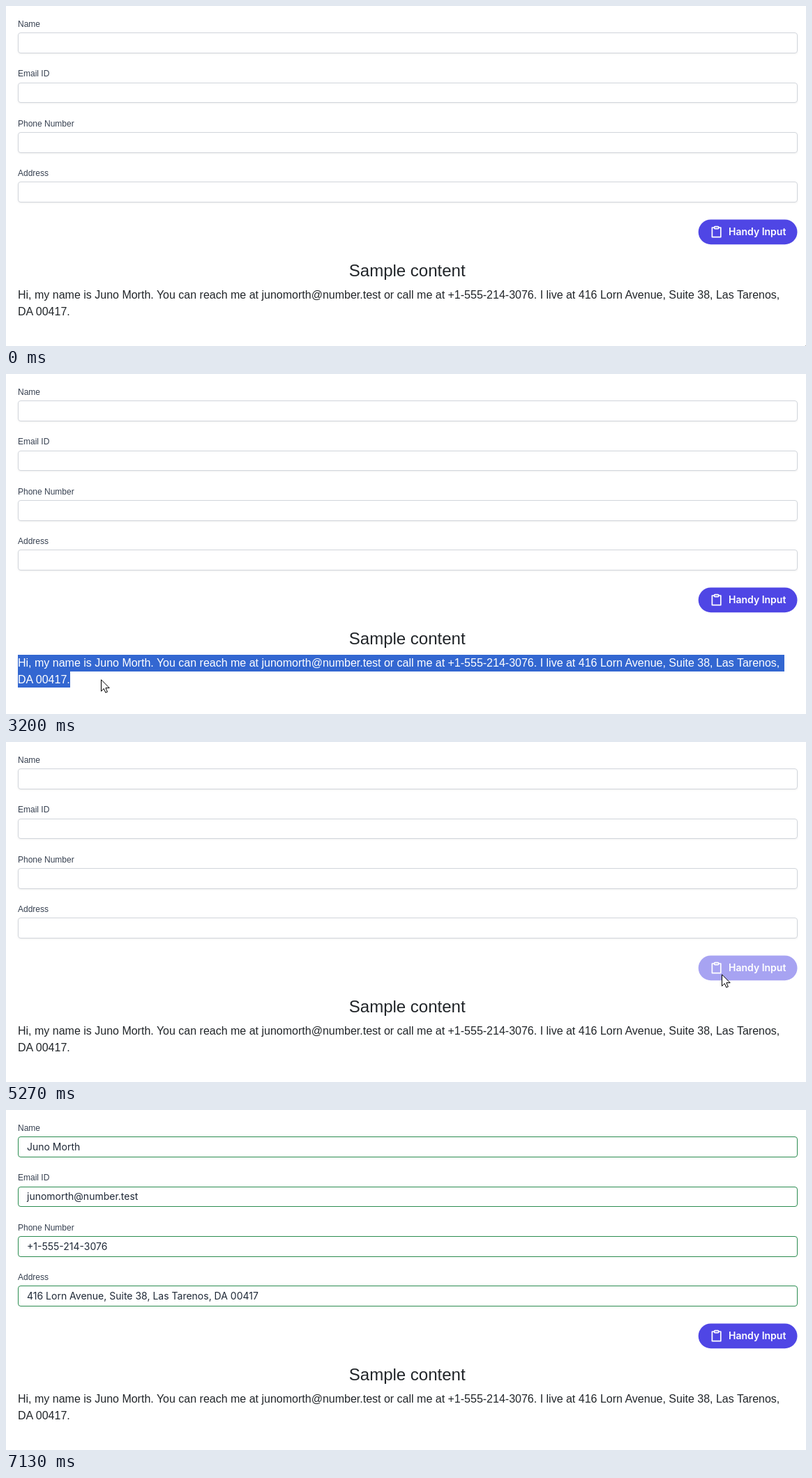
These frames come from a looping animation (1147 by 488 pixels, 7800 ms). An HTML page:

```html
<!DOCTYPE html>
<html lang="en">
<head>
<meta charset="utf-8">
<title>Form fill demo</title>
<style>
  html, body { margin: 0; width: 100%; height: 100%; overflow: hidden; background: #fff; }
  svg { display: block; }
  text { font: 16px "Liberation Sans", Arial, sans-serif; fill: #212529; white-space: pre; }
  .label { font-size: 12px; fill: #374151; }
  .value { font: 14px Inter, sans-serif; fill: #1f2937; }
  .heading { font-size: 24px; text-anchor: middle; }
  .caption { font: 600 14px Inter, sans-serif; fill: #fff; }
  .box { fill: #fff; stroke: #d1d5db; filter: drop-shadow(0 1px 1px rgba(0, 0, 0, .06)); }
  .valid .box { stroke: #2b8c50; filter: none; }
  .pointer { fill: #fff; stroke: #000; stroke-linejoin: round; }
  #beam { fill: #fff; mix-blend-mode: difference; }
  #marked text { fill: #fff; }
</style>
</head>
<body>
<svg width="1147" height="488" viewBox="0 0 1147 488">
  <defs>
    <clipPath id="range"><path id="rangePath"/></clipPath>
  </defs>
  <rect width="1147" height="488" fill="#fff"/>
  <g id="form"></g>
  <rect id="button" x="992.7" y="306.5" width="141.8" height="35.7" rx="17.8"/>
  <g fill="none" stroke="#fff" stroke-width="1.7" stroke-linejoin="round">
    <path d="M1015.5 318H1012.4V331.6H1024.8V318H1021.7"/>
    <rect x="1015.5" y="316.6" width="6.2" height="3" rx="1"/>
  </g>
  <text class="caption" x="1036" y="329">Handy Input</text>
  <text class="heading" x="575.2" y="388">Sample content</text>
  <g id="plain"></g>
  <g id="marked" clip-path="url(#range)">
    <rect x="17" y="403" width="1099" height="47" fill="#3367d1"/>
  </g>
  <path id="beam" d="M-4.5-9H-1L0-8.5 1-9H4.5V-8H1L.5-7.5V7.5L1 8H4.5V9H1L0 8.5-1 9H-4.5V8H-1L-.5 7.5V-7.5L-1-8H-4.5Z"/>
  <path id="arrow" class="pointer" d="M.5 .8V17.3L4.3 13.6 6.8 19.3 9.4 18.2 6.9 12.6H12.2Z"/>
  <path id="hand" class="pointer" d="M5.5 14V2.2a1.6 1.6 0 0 1 3.2 0V10 7.5a1.4 1.4 0 0 1 2.8 0V10.5 8.3a1.4 1.4 0 0 1 2.8 0V11 9.6a1.3 1.3 0 0 1 2.6 0V15.5Q16.9 21.8 11 21.8 7 21.8 5.2 18.8L1.2 13.4A1.5 1.5 0 0 1 3.4 11.4L5.5 13.5Z"/>
</svg>
<script>
const $ = id => document.getElementById(id);
const LOOP = 7800, RATE = 15, ROW = 71.33;

const person = {
  name: 'Juno Morth',
  mail: 'junomorth@number.test',
  phone: '+1-555-214-3076',
  street: '416 Lorn Avenue, Suite 38, Las Tarenos,',
  zip: 'DA 00417'
};
const lines = [
  `Hi, my name is ${person.name}. You can reach me at ${person.mail} or call me at ${person.phone}. I live at ${person.street}`,
  `${person.zip}.`
];
const fields = [
  ['Name', person.name],
  ['Email ID', person.mail],
  ['Phone Number', person.phone],
  ['Address', `${person.street} ${person.zip}`]
];

function add(parent, tag, attrs, text = '') {
  const el = document.createElementNS('http://www.w3.org/2000/svg', tag);
  for (const key in attrs) el.setAttribute(key, attrs[key]);
  el.textContent = text;
  $(parent).append(el);
  return el;
}

const values = fields.map(([label, value], i) => {
  const snap = y => Math.round(y + ROW * i);
  const top = snap(38.4), bottom = snap(67.9);
  add('form', 'text', { class: 'label', x: 17, y: snap(29.9) }, label);
  add('form', 'rect', { class: 'box', x: 17.5, y: top + .5, width: 1117, height: bottom - top - 1, rx: 3.5 });
  return add('form', 'text', { class: 'value', x: 30, y: snap(58) }, value);
});
for (const id of ['plain', 'marked'])
  lines.forEach((line, i) => add(id, 'text', { x: 17, y: 420 + 24 * i }, line));

// Each move eases the pointer to a new place: from tick, to tick, x, y
const home = [1146, 487];
const moves = [
  [2, 5, 369, 349], [7, 16, 101, 441], [23, 27, 19, 424], [27, 31, 17, 429],
  [36, 37, 12, 419], [43, 48, 136, 438], [55, 60, 699, 440], [62, 71, 1026, 333],
  [99, 107, 60, 495]
];

const within = (tick, from, to) => tick >= from && tick < to;

function ease(k) {
  k = Math.min(1, Math.max(0, k));
  return k * k * (3 - 2 * k);
}

function pointerAt(tick) {
  let [x, y] = home;
  for (const [from, to, nextX, nextY] of moves) {
    const k = ease((tick - from) / (to - from));
    x += (nextX - x) * k;
    y += (nextY - y) * k;
  }
  return [Math.round(x), Math.round(y)];
}

function buttonColor(tick) {
  if (within(tick, 75, 77)) return '#3730a3';
  if (within(tick, 77, 93)) return '#a7a3f2';
  return within(tick, 70, 101) ? '#4338ca' : '#4f46e5';
}

// The drag runs back along the second line, then takes in the first
function selection(tick, x) {
  return tick < 27
    ? `M${x} 427H92V450H${x}Z`
    : 'M17 427H92V450H17ZM17 403H1116V427H17Z';
}

function pointerKind(tick, x, y, selected) {
  if (within(tick, 70, 79) || within(tick, 93, 101)) return 'hand';
  const onText = within(x, 17, 1111) && within(y, 404, 427);
  return within(tick, 24, 37) || (onText && !selected) ? 'beam' : 'arrow';
}

const placing = {
  hand: (x, y) => `translate(${x - 7.3} ${y - .2}) scale(1.05)`,
  beam: (x, y) => `translate(${x + .5} ${y})`,
  arrow: (x, y) => `translate(${x} ${y})`
};

function show(el, on) { el.style.display = on ? '' : 'none'; }

function draw(tick) {
  const [x, y] = pointerAt(tick);
  const selected = within(tick, 25, 56);
  const kind = pointerKind(tick, x, y, selected);

  for (const id in placing) show($(id), id === kind);
  $(kind).setAttribute('transform', placing[kind](x, y));

  show($('marked'), selected);
  $('rangePath').setAttribute('d', selection(tick, x));
  $('button').setAttribute('fill', buttonColor(tick));
  for (const el of values) show(el, tick >= 93);
  $('form').setAttribute('class', tick >= 94 ? 'valid' : '');
}

const start = performance.now();
function loop() {
  const t = (performance.now() - start) % LOOP;
  draw(Math.min(116, Math.floor((t + 4) * RATE / 1000)));
  requestAnimationFrame(loop);
}
loop();
</script>
</body>
</html>
```
